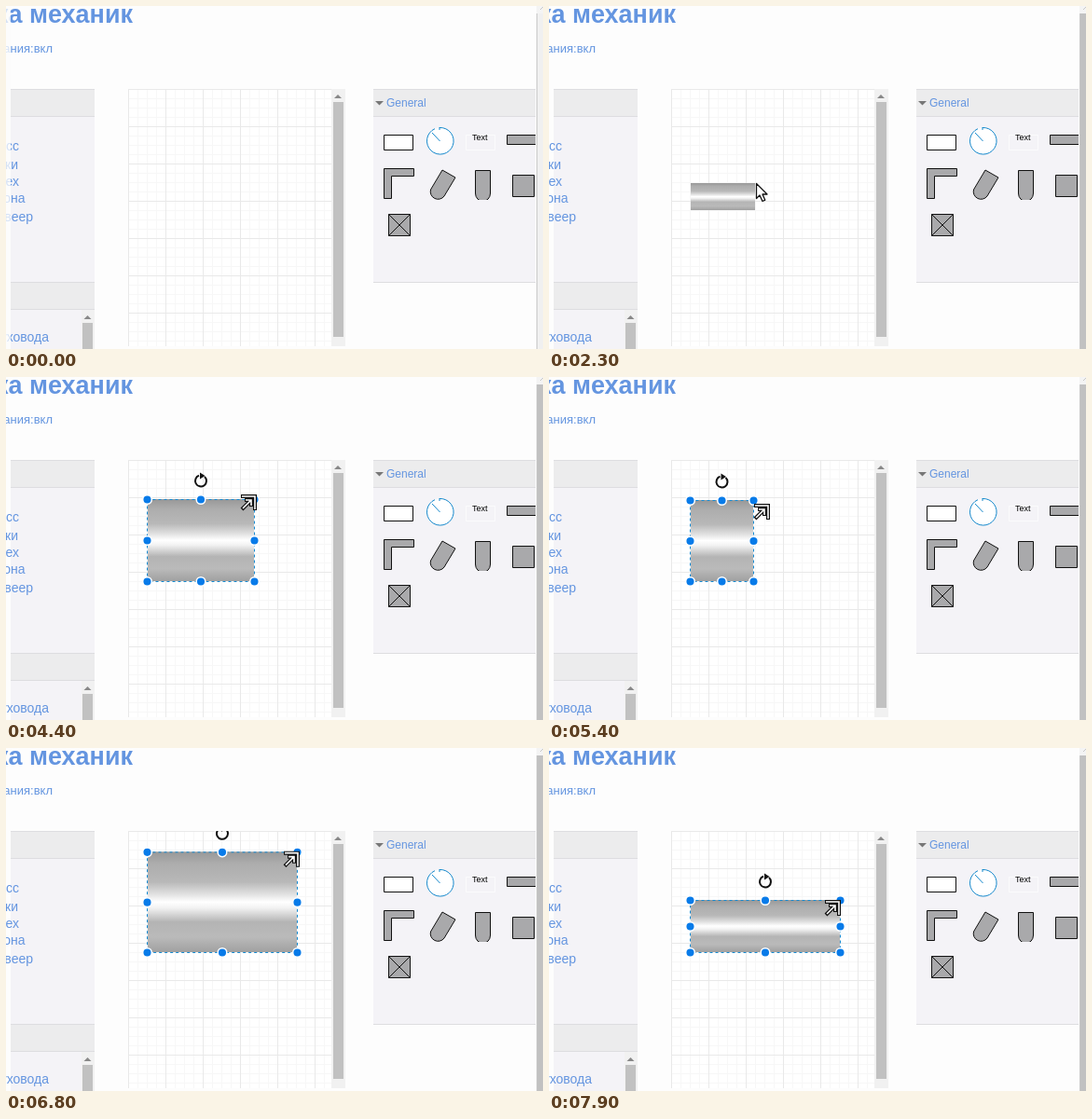
These frames come from a looping animation (576x368 px, 8000 ms). An HTML page:

```html
<!DOCTYPE html>
<html lang="ru">
<head>
<meta charset="utf-8">
<style>
html, body { margin: 0; width: 100%; height: 100%; overflow: hidden; background: #fdfdfd }
svg { display: block; font-family: "Liberation Sans", Arial, sans-serif }
.blue { fill: #6495e0 }
.end { text-anchor: end; font-size: 14px }
.head { fill: #ececed }
.body { fill: #f4f3f7 }
.rule { stroke: #dddde0; fill: none }
.shape { fill: #a9a9ab; stroke: #111; stroke-width: 1 }
</style>
</head>
<body>
<svg width="576" height="368" viewBox="0 0 576 368">
  <defs>
    <linearGradient id="metal" x2="0" y2="1">
      <stop offset="0" stop-color="#989898"/>
      <stop offset=".12" stop-color="#adadad"/>
      <stop offset=".3" stop-color="#b8b8b8"/>
      <stop offset=".42" stop-color="#e0e0e0"/>
      <stop offset=".5" stop-color="#fff"/>
      <stop offset=".56" stop-color="#f2f2f2"/>
      <stop offset=".7" stop-color="#b4b4b4"/>
      <stop offset=".85" stop-color="#bababa"/>
      <stop offset="1" stop-color="#a0a0a0"/>
    </linearGradient>
    <pattern id="grid" x="131" y="89" width="40" height="40" patternUnits="userSpaceOnUse">
      <path d="M10.5 0V40M20.5 0V40M30.5 0V40M0 10.5H40M0 20.5H40M0 30.5H40" stroke="#f7f7f7"/>
      <path d="M.5 0V40M0 .5H40" stroke="#e9e9e9"/>
    </pattern>
    <clipPath id="paper"><path d="M131 89H349V365H131Z"/></clipPath>
    <clipPath id="palette"><path d="M394 89H568V297H394Z"/></clipPath>
    <clipPath id="row"><path d="M394 170H568V208H394Z"/></clipPath>
    <clipPath id="page"><path d="M0 0H568V368H0Z"/></clipPath>
  </defs>

  <!-- left column -->
  <path class="head" d="M5 89H95V119H5ZM5 296H95V326H5Z"/>
  <path class="body" d="M5 119H95V296H5ZM5 326H95V368H5Z"/>
  <path class="rule" d="M5 89.5H95M5 118.5H95M5 296.5H95M5 325.5H95"/>
  <path fill="#f1f1f1" d="M81 326H95V368H81Z"/>
  <path fill="#c1c1c1" d="M82 340H93V368H82Z"/>
  <path fill="#888" d="M83.5 336H91.5L87.5 332Z"/>
  <g class="blue end">
    <text x="136" y="18" style="font-size:27px;font-weight:bold">ка механик</text>
    <text x="50" y="50" style="font-size:13px">ания:вкл</text>
    <text x="14" y="155">сс</text>
    <text x="13" y="175">ки</text>
    <text x="14" y="193">ех</text>
    <text x="20.5" y="211">она</text>
    <text x="29" y="231">веер</text>
    <text x="46" y="360">уховода</text>
  </g>
  <path id="fade" fill="#fdfdfd" opacity=".75" d="M0 0H5V368H0Z"/>

  <!-- drawing area -->
  <path fill="#fff" d="M131 89H349V365H131Z"/>
  <path fill="url(#grid)" d="M131 89H349V365H131Z"/>
  <path fill="#f1f1f1" d="M349 89H364V365H349Z"/>
  <path fill="#c1c1c1" d="M351 103H362V355H351Z"/>
  <path fill="#888" d="M352 99H360L356 95Z"/>

  <!-- palette -->
  <g clip-path="url(#palette)">
    <path class="head" d="M394 89H568V119H394Z"/>
    <path class="body" d="M394 119H568V297H394Z"/>
    <path class="rule" d="M394 89.5H568M394 118.5H568M394 296.5H568"/>
    <path fill="#777" d="M396 102H405L400.5 106.5Z"/>
    <text class="blue" x="408" y="108" font-size="12">General</text>
    <path class="shape" style="fill:#fff" d="M405.5 138.5h31v16h-31z"/>
    <path fill="#fff" stroke="#1488cc" d="M465 130.500A14.300 14.300 0 1 1 460 131.700M457 136L465.500 145M465 130V133"/>
    <path fill="none" stroke="#fbfbfc" d="M493.500 138.500h31v16h-31z"/>
    <text x="500" y="144" font-size="9">Text</text>
    <path class="shape" d="M537.500 138.500h40v10h-40z"/>
    <g clip-path="url(#row)">
      <path class="shape" d="M405.500 174.500H437.500V182.500H413.500V206.500H405.500Z"/>
      <path class="shape" d="M468 176L482 184L470 204A8.200 8.200 0 0 1 455.500 197Z"/>
      <path class="shape" d="M503.500 176.500H519.500V201A8 8.500 0 0 1 503.500 201Z"/>
      <path class="shape" d="M543.500 181.500h23v23h-23z"/>
    </g>
    <path class="shape" d="M410.500 223.500h23v23h-23zl23 23m0-23l-23 23"/>
  </g>

  <!-- window scrollbar -->
  <path fill="#f4f4f4" d="M569 0H576V368H569Z"/>
  <path id="bar" d="M570 8H576V368H570Z"/>
  <path fill="none" stroke="#c8c8c8" d="M569.500 8V368M573 4L576 1"/>

  <!-- moving parts -->
  <g clip-path="url(#paper)">
    <rect id="pipe" x="152" fill="url(#metal)"/>
    <g id="selection">
      <rect id="frame" x="151.500" fill="none" stroke="#168bd2" stroke-dasharray="3 3"/>
      <g id="knobs" fill="#087be9" stroke="#fff" stroke-width="1.500"></g>
      <g id="spin">
        <path fill="none" stroke="#fff" stroke-width="4" d="M4-5A6.200 6.200 0 1 1-2-6"/>
        <path fill="none" stroke="#111" stroke-width="2" d="M4-4.500A6 6 0 1 1-2-5.700"/>
        <path fill="#111" d="M-1-9L4.500-5.500L-1-2Z"/>
      </g>
    </g>
  </g>
  <g clip-path="url(#page)">
    <rect id="ghost" width="69" height="29" fill="none" stroke="#222" stroke-dasharray="3 3"/>
  </g>
  <path id="arrow" fill="#fff" stroke="#111" stroke-width="1.300" stroke-linejoin="round"
    d="M.5.500V16.500L4 13L7 19.500L9.800 18.200L7 12H12Z"/>
  <g id="resize" fill="none">
    <path stroke="#111" stroke-width="4" d="M-16 1H-1V16M-15 15L-5 5M-12 5H-5V12"/>
    <path stroke="#fff" stroke-width="1.600" d="M-15 1H-1V15M-14 14L-5 5M-11 5H-5V11"/>
  </g>
</svg>
<script>
const LOOP = 8000, LEFT = 151, BOTTOM = 219;
const el = id => document.getElementById(id);
const set = (node, attrs) => { for (const k in attrs) node.setAttribute(k, attrs[k]); };
const show = (id, on) => { el(id).style.display = on ? '' : 'none'; };
const place = (id, x, y) => set(el(id), { transform: `translate(${x} ${y})` });

// time, x, y of the pointer
const pointerPath = [
  [300, 570, 340], [1000, 540, 143], [1200, 540, 143], [2000, 152, 190],
  [2300, 222, 190], [2600, 222, 190]
];
// time, right edge, top edge, resize pointer x, y
const sizePath = [
  [2600, 221, 190, 223, 189], [3100, 221, 190, 223, 189], [3800, 234, 173, 238, 170],
  [4400, 266, 131, 268, 127], [4700, 266, 121, 268, 120], [5000, 258, 122, 262, 122],
  [5400, 219, 132, 236, 137], [5600, 225, 131, 230, 132], [6200, 298, 113, 300, 110],
  [6600, 312, 110, 314, 109], [6900, 312, 112, 314, 113], [7300, 312, 135, 313, 141],
  [7900, 312, 163, 312, 164]
];

function at(path, t) {
  const i = path.findIndex(k => k[0] > t);
  if (i < 0) return path[path.length - 1].slice(1);
  if (i === 0) return path[0].slice(1);
  const a = path[i - 1], b = path[i], p = (t - a[0]) / (b[0] - a[0]);
  return a.slice(1).map((v, j) => v + (b[j + 1] - v) * p);
}

const knobs = Array.from({ length: 8 }, () => {
  const c = document.createElementNS('http://www.w3.org/2000/svg', 'circle');
  c.setAttribute('r', 4.8);
  return el('knobs').appendChild(c);
});

function draw(t) {
  const selected = t >= 2600;
  show('fade', t < 100);
  set(el('bar'), { fill: t < 100 ? '#f0f0f0' : '#c1c1c1' });

  const [px, py] = at(pointerPath, t);
  show('arrow', t >= 300 && !selected);
  place('arrow', px, py);
  show('ghost', t > 1200 && t < 2000);
  place('ghost', px + .5, py + .5);

  const [right, top, cx, cy] = at(sizePath, t);
  const w = right - LEFT, h = BOTTOM - top, midX = LEFT + w / 2;
  show('pipe', t >= 2000);
  set(el('pipe'), { y: top, width: w - 1, height: h, rx: selected ? 4 : 0 });

  show('selection', selected);
  show('resize', selected);
  set(el('frame'), { y: top + .5, width: w, height: h });
  const xs = [LEFT, midX, right], ys = [top, top + h / 2, BOTTOM];
  [0, 1, 2, 3, 5, 6, 7, 8].forEach((n, i) =>
    set(knobs[i], { cx: xs[n % 3] + .5, cy: ys[Math.floor(n / 3)] + .5 }));
  place('spin', midX + .5, top - 19.5);
  place('resize', cx, cy);
}

const start = performance.now();
function tick() {
  const t = (performance.now() - start) % LOOP;
  draw(Math.floor(t / 100) * 100);
  requestAnimationFrame(tick);
}
tick();
</script>
</body>
</html>
```
